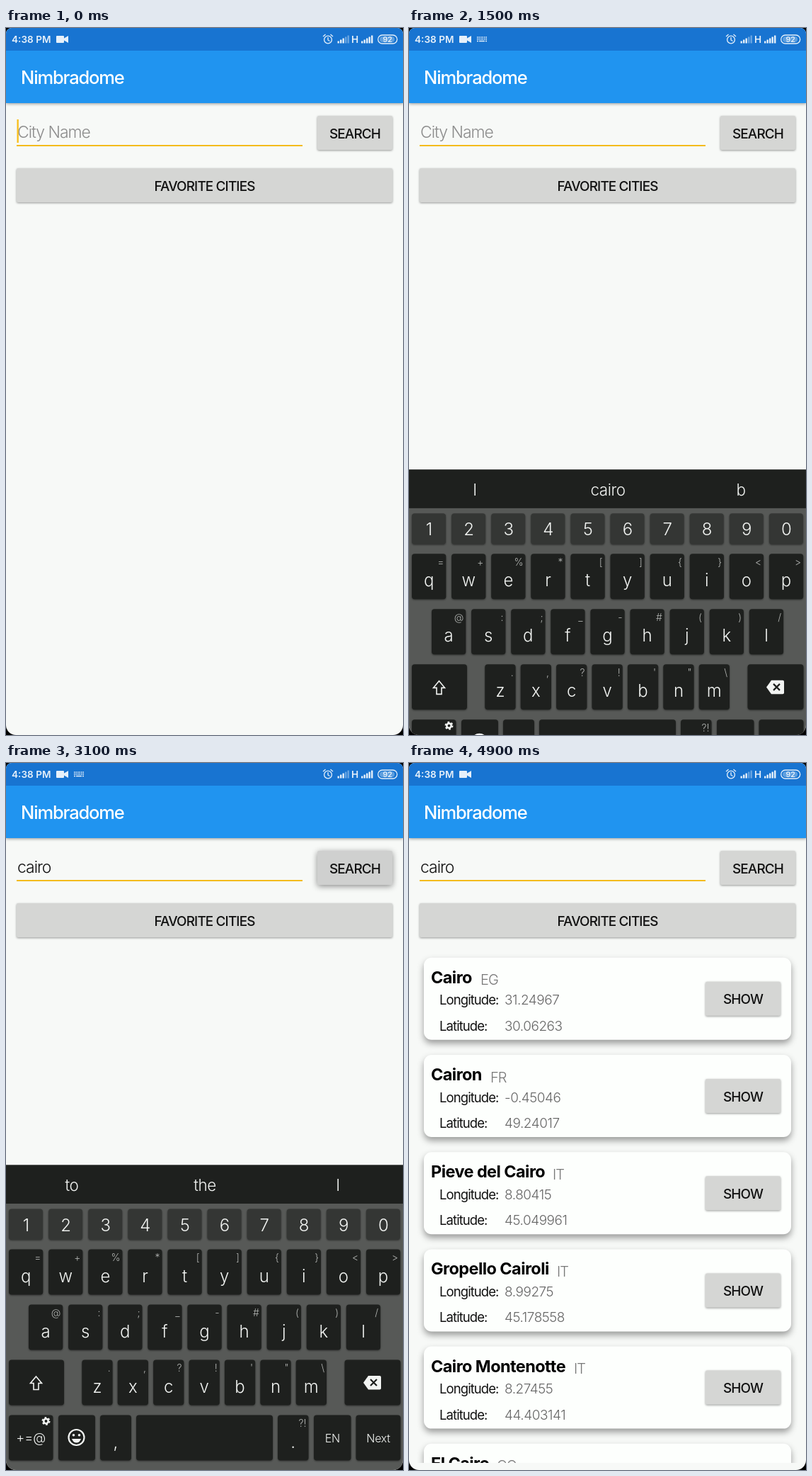
Recreate the animation shown at these times as an HTML page. Size 561 by 998 pixels, loop 5 s.

```html
<!DOCTYPE html>
<html lang="en">
<head>
<meta charset="utf-8">
<title>City search</title>
<style>
  html, body { margin: 0; width: 100%; height: 100%; overflow: hidden; background: #000; }
  svg { display: block; width: 100%; height: 100%; background: #f7f9f7; border-radius: 8px 8px 14px 14px; }
  text { font-family: Inter, Roboto, sans-serif; font-optical-sizing: none; letter-spacing: -.045em; white-space: pre; }
  .bar { filter: drop-shadow(0 1px 2px rgba(0,0,0,.4)); }
  .status { font-size: 13.6px; font-weight: 600; letter-spacing: 0; fill: #e6f0fa; }
  .title { font-size: 25.5px; font-weight: 500; fill: #fff; }
  .field { font-size: 23px; font-weight: 300; }
  .btn { fill: #d5d6d4; filter: drop-shadow(0 1px 1.5px rgba(0,0,0,.4)); }
  .btn.down { fill: #cfd0cf; filter: drop-shadow(0 2px 4px rgba(0,0,0,.45)); }
  .label { font-size: 18.9px; font-weight: 500; fill: #111; text-anchor: middle; }
  .card { fill: #fdfffd; filter: drop-shadow(0 5px 5px rgba(0,0,0,.38)); }
  .name { font-size: 23.5px; font-weight: 700; letter-spacing: -.025em; }
  .code { font-size: 20px; font-weight: 300; fill: #777; }
  .row { font-size: 18.5px; font-weight: 400; letter-spacing: -.05em; fill: #111; }
  .value { font-size: 19px; font-weight: 300; letter-spacing: -.025em; fill: #666; }
  .key { fill: #1e201e; filter: drop-shadow(0 1px 1px rgba(0,0,0,.45)); }
  .num { fill: #343634; }
  .big, .word, .small, .mode { font-weight: 300; fill: #f2f4f2; text-anchor: middle; letter-spacing: 0; }
  .big { font-size: 24px; }
  .word { font-size: 22.5px; letter-spacing: -.02em; }
  .small { font-size: 16px; letter-spacing: -.02em; }
  .mode { font-size: 18.5px; }
  .alt { font-size: 14px; font-weight: 300; fill: #b4b6b4; text-anchor: end; letter-spacing: 0; }
</style>
</head>
<body>
<svg id="stage" viewBox="0 0 561 998"></svg>
<script>
const LOOP = 5000, STEP = 100;
const stage = document.getElementById('stage');

function el(parent, tag, attrs, content) {
  const node = document.createElementNS('http://www.w3.org/2000/svg', tag);
  for (const k in attrs) node.setAttribute(k, attrs[k]);
  if (content !== undefined) node.textContent = content;
  return parent.appendChild(node);
}
const group = (parent, attrs = {}) => el(parent, 'g', attrs);
const rect = (parent, x, y, width, height, attrs) => el(parent, 'rect', { x, y, width, height, ...attrs });
const text = (parent, x, y, cls, s) => el(parent, 'text', { x, y, class: cls }, s);
const path = (parent, d, attrs) => el(parent, 'path', { d, ...attrs });
const line = (parent, d, stroke, width) => path(parent, d, { fill: 'none', stroke, 'stroke-width': width });
const show = (node, on) => node.setAttribute('visibility', on ? 'visible' : 'hidden');

function button(parent, x, y, w, label) {
  const box = rect(parent, x, y, w, 48, { rx: 2, class: 'btn' });
  text(parent, x + w / 2, y + 31.5, 'label', label);
  return box;
}

// Result list
const clip = rect(el(stage, 'clipPath', { id: 'view' }), 0, 262, 561, 295);
const list = group(stage, { 'clip-path': 'url(#view)' });
[
  ['Cairo', 'EG', 101, '31.24967', '30.06263'],
  ['Cairon', 'FR', 115, '-0.45046', '49.24017'],
  ['Pieve del Cairo', 'IT', 203, '8.80415', '45.049961'],
  ['Gropello Cairoli', 'IT', 209, '8.99275', '45.178558'],
  ['Cairo Montenotte', 'IT', 233, '8.27455', '44.403141'],
  ['El Cairo', 'CO', 124, '', '']
].forEach(([name, code, codeX, lon, lat], i) => {
  const card = group(list, { transform: `translate(0 ${274.8 + i * 137.2})` });
  rect(card, 21, 0, 519, 116, { rx: 11, class: 'card' });
  text(card, 31, 36, 'name', name);
  text(card, codeX, 38.7, 'code', code);
  text(card, 43, 66.5, 'row', 'Longitude:');
  text(card, 135, 66.5, 'value', lon);
  text(card, 43, 103, 'row', 'Latitude:');
  text(card, 135, 103, 'value', lat);
  button(card, 419, 34, 106, 'SHOW');
});

// Search form
const query = text(stage, 16, 155, 'field');
rect(stage, 15, 165, 404, 2, { fill: '#f3bb1c' });
const caret = rect(stage, 15.5, 129, 2.3, 33, { fill: '#f8be1a' });
const search = button(stage, 440, 124, 106, 'SEARCH');
button(stage, 15, 198, 531, 'FAVORITE CITIES');

// Header and status bar
rect(stage, 0, 30, 561, 76, { fill: '#2094f0', class: 'bar' });
text(stage, 21, 79, 'title', 'Nimbradome');
rect(stage, 0, 0, 561, 32, { fill: '#1874d1' });
const ink = '#e6f0fa';
text(stage, 8, 21, 'status', '4:38 PM');
path(stage, 'M72 11h9q1 0 1 1v2.5l6-3.5v10l-6-3.5v2.5q0 1-1 1h-9q-1 0-1-1v-8q0-1 1-1z', { fill: ink });
const kbIcon = group(stage);
for (const y of [13, 15.6]) line(kbIcon, `M96 ${y}h14`, ink, 1.6).setAttribute('stroke-dasharray', '1.5 1');
line(kbIcon, 'M96 18.5h2m1 0h8m1 0h2', ink, 1.6);
el(stage, 'circle', { cx: 455, cy: 16.5, r: 5.4, fill: 'none', stroke: ink, 'stroke-width': 1.3 });
line(stage, 'M455 13v4l2.5 1.5M448 12l3.5-3M462 12l-3.5-3', ink, 1.3);
function signal(x, strong) {
  for (let i = 0; i < 5; i++)
    rect(stage, x + i * 3.5, 18.5 - i * 2, 2.4, 3 + i * 2, { fill: ink, opacity: i < strong ? 1 : .4 });
}
signal(468.5, 3);
text(stage, 488, 21, 'status', 'H');
signal(502, 5);
rect(stage, 525.7, 10, 27, 12, { rx: 6, fill: 'none', stroke: ink, 'stroke-width': 1.3 });
rect(stage, 528, 12, 21, 8, { rx: 4, fill: ink, opacity: .35 });
text(stage, 532.5, 20, 'status', '92').style.fontSize = '10.5px';

// Keyboard
const board = group(stage);
rect(board, 0, 567.5, 561, 431, { fill: '#575957' });
rect(board, 0, 567.5, 561, 54.5, { fill: '#1e201e' });
const words = [93, 281, 469].map(x => text(board, x, 604, 'word'));

function key(x, y, w, label = '', alt = '', cls = 'big') {
  rect(board, x, y, w, 64, { rx: 4, class: 'key' });
  text(board, x + w / 2, y + (cls === 'big' ? 46 : 38.5), cls, label);
  text(board, x + w - 3, y + 16.5, 'alt', alt);
}
const keyRow = (letters, alts, x, y, w, pitch) =>
  [...letters].forEach((c, i) => key(x + i * pitch, y, w, c, alts[i]));

[...'1234567890'].forEach((c, i) => {
  rect(board, 4 + i * 56.1, 629.5, 48, 43.5, { rx: 4, class: 'key num' });
  text(board, 28.5 + i * 56.1, 660.5, 'big', c);
});
keyRow('qwertyuiop', '=+%*[]{}<>', 4, 686.5, 48.3, 56.1);
keyRow('asdfghjkl', '@:;_-#()/', 32, 764.5, 48.3, 56.1);
keyRow('zxcvbnm', '.,?!\'"\\', 107.3, 842.5, 43.3, 50.4);
key(4, 842.5, 78);
key(478.5, 842.5, 79);
key(4, 920.5, 62.5, '+=@', '', 'mode');
key(74, 920.5, 52);
key(133, 920.5, 44, ',');
key(184, 920.5, 193);
key(384, 920.5, 43.5, '.', '?!');
key(435, 920.5, 52.5, 'EN', '', 'small');
key(494.5, 920.5, 63, 'Next', '', 'small');

const pale = '#f2f4f2';
line(board, 'M42.5 866l8 9.5h-4.5v9h-7v-9h-4.5z', pale, 1.6);
path(board, 'M512 865h16q2 0 2 2v15.5q0 2-2 2h-16l-7-9.75z', { fill: pale });
line(board, 'M515 870l9 9m0-9l-9 9', '#1e201e', 2.2);
el(board, 'circle', { cx: 99.5, cy: 952, r: 11, fill: 'none', stroke: pale, 'stroke-width': 2.2 });
for (const x of [95.5, 103.5]) el(board, 'circle', { cx: x, cy: 948.7, r: 1.8, fill: pale });
path(board, 'M93 954h13q-2 5.5-6.5 5.5t-6.5-5.5z', { fill: pale });
el(board, 'circle', { cx: 56.5, cy: 929, r: 3.2, fill: 'none', stroke: pale, 'stroke-width': 2.6 });
el(board, 'circle', { cx: 56.5, cy: 929, r: 5, fill: 'none', stroke: pale, 'stroke-width': 2, 'stroke-dasharray': '2.6 2.636' });

const RISE = 1400, TYPED = 2200, PRESS = 3100, RESULTS = 3500, FALL = 4560;
const ramp = (t, start, length) => Math.min(1, Math.max(0, (t - start) / length));

function draw(t) {
  const typed = t >= TYPED;
  query.textContent = typed ? 'cairo' : 'City Name';
  query.setAttribute('fill', typed ? '#111' : '#8c8c8c');
  caret.setAttribute('x', typed ? 67.3 : 15.5);
  // The blink restarts when the word is entered
  show(caret, (typed ? t + 700 : t + 200) % 1000 < 500);

  search.setAttribute('class', t >= PRESS && t < PRESS + 200 ? 'btn down' : 'btn');
  show(list, t >= RESULTS);
  clip.setAttribute('height', t < FALL ? 295 : 726);

  (typed ? ['to', 'the', 'I'] : ['I', 'cairo', 'b']).forEach((w, i) => words[i].textContent = w);
  const hidden = (1 - ramp(t, RISE, 250)) ** 4 + ramp(t, FALL, 202) ** 2;
  board.setAttribute('transform', `translate(0 ${hidden * 431})`);
  show(board, hidden < 1);
  show(kbIcon, t > RISE && t < FALL);
}

const start = performance.now();
function tick() {
  const t = (performance.now() - start) % LOOP;
  draw(Math.floor(t / STEP) * STEP);
  requestAnimationFrame(tick);
}
tick();
</script>
</body>
</html>
```
